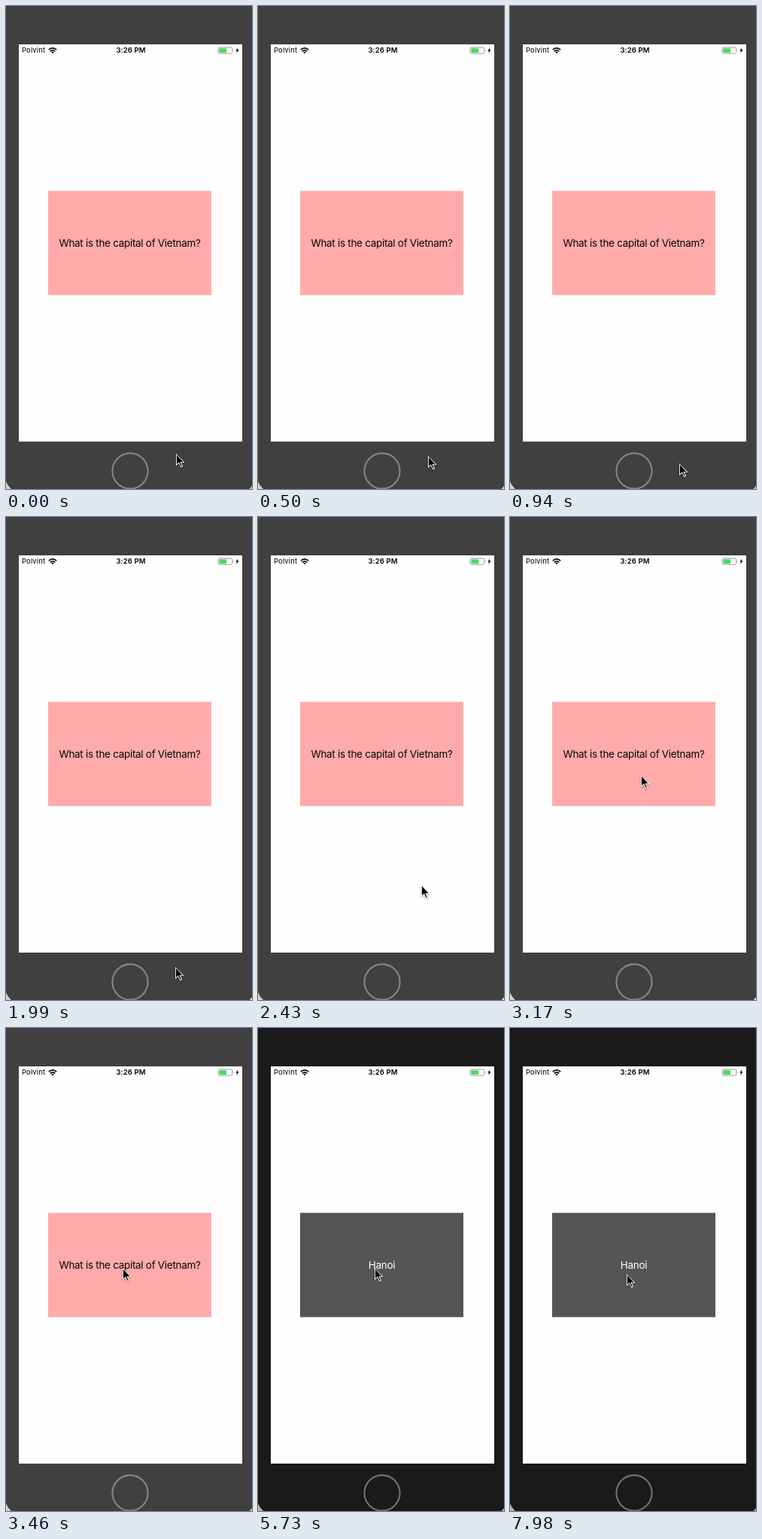
Animation of 327x642 px, one loop 8 s. Source, as an HTML page:

```html
<!DOCTYPE html>
<html lang="en">
<head>
<meta charset="utf-8">
<title>Flash card</title>
<style>
  html, body { margin: 0; width: 100%; height: 100%; overflow: hidden; }
  svg { display: block; width: 327px; height: 642px; font-family: Inter, sans-serif;
    --body: #404040; --ring: #848484; --desk: #d2d2d2; --card: #ffabab; --ink: #0a0505; }
  svg.flipped { --body: #1a1a1a; --ring: #727272; --desk: #b4b4b4; --card: #555; --ink: #fff; }
  .body { fill: var(--body); }
  .desk { fill: var(--desk); }
  .ring { fill: none; stroke: var(--ring); stroke-width: 2.1; }
  .card { fill: var(--card); }
  .label { fill: var(--ink); font-size: 13.46px; letter-spacing: -.28px; text-anchor: middle; }
  .status { font-size: 9.5px; letter-spacing: .1px; }
  .wifi { fill: none; stroke: #000; stroke-width: 1.7; }
  #cursor { filter: drop-shadow(0 1px 1px rgba(0, 0, 0, .4)); }
</style>
</head>
<body>
<svg id="stage" viewBox="0 0 327 642">
  <rect class="body" width="327" height="642"/>
  <path class="desk" d="M0 632Q2 637.5 7 642H0ZM327 638Q325.5 640 323.5 642H327Z"/>
  <circle class="ring" cx="165" cy="618" r="23.6"/>
  <rect x="17" y="51" width="297" height="528" fill="#fefefe"/>

  <g class="status">
    <text x="21" y="62.4">Polvint</text>
    <text x="166" y="62.4" text-anchor="middle" font-weight="600">3:26 PM</text>
    <path class="wifi" d="M56.8 58.2Q62 53.4 67.2 58.2M58.8 60.3Q62 57.3 65.2 60.3"/>
    <path d="M60.2 61.4Q62 60 63.8 61.4L62 63.3Z"/>
    <rect x="282" y="55" width="18.8" height="8.2" rx="2" fill="none" stroke="#929292" stroke-width=".9"/>
    <rect x="283.4" y="56.2" width="9.8" height="5.8" rx=".7" fill="#4cd964"/>
    <path d="M301.9 57.6Q303.3 59.1 301.9 60.6Z" fill="#929292"/>
    <path d="M308.3 55.2L305.3 59.6H307L306.2 62.9L309.5 58.3H307.6Z"/>
  </g>

  <rect class="card" x="56" y="245.7" width="217" height="138.6"/>
  <text class="label" id="label" x="164.5" y="320"></text>

  <g id="cursor">
    <path d="M0 0V16L3.7 12.7L6.3 18.2L9.2 17L7 11.8H11.6Z" fill="#fff"/>
    <path d="M.9 1.8V13.9L3.9 11.2L6.8 17L7.9 16.5L5.4 10.9H9.5Z"/>
  </g>
</svg>
<script>
  const LOOP = 8000, FLIP = 5730, STEP = 147;
  const home = [226, 595];
  // Pointer moves: each runs along a quadratic curve in a few held steps
  const moves = [
    { start: 493, steps: 4, via: [226, 602], to: [225, 608] },
    { start: 1986, steps: 1, to: [225, 598] },
    { start: 2128, steps: 5, via: [225, 493], to: [204, 436] },
    { start: 2868, steps: 5, via: [179, 331], to: [155, 319] },
    { start: 7980, steps: 1, to: [155, 327] }
  ];
  const [stage, label, cursor] = ['stage', 'label', 'cursor'].map(id => document.getElementById(id));

  function pointerAt(t) {
    let from = home;
    for (const { start, steps, to, via = to } of moves) {
      if (t < start) break;
      const s = Math.min(1, (Math.floor((t - start) / STEP) + 1) / steps);
      from = from.map((a, i) => Math.round((1 - s) ** 2 * a + 2 * s * (1 - s) * via[i] + s * s * to[i]));
    }
    return from;
  }

  function draw() {
    const t = performance.now() % LOOP;
    const flipped = t >= FLIP;
    stage.classList.toggle('flipped', flipped);
    label.textContent = flipped ? 'Hanoi' : 'What is the capital of Vietnam?';
    cursor.setAttribute('transform', `translate(${pointerAt(t)})`);
    requestAnimationFrame(draw);
  }
  draw();
</script>
</body>
</html>
```
